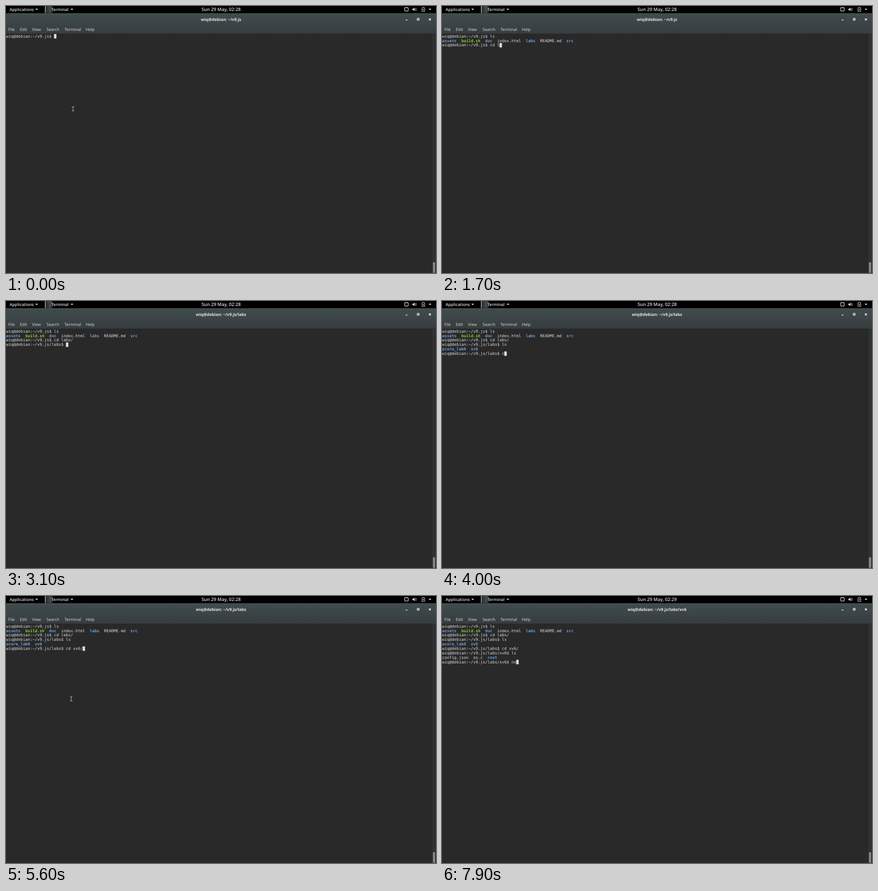
Write an HTML page that moves like this. It is 949 px wide and 590 px high and loops after 8 s.

```html
<!DOCTYPE html>
<html lang="en">
<head>
<meta charset="utf-8">
<title>Terminal session</title>
<style>
  html, body { margin: 0; width: 100%; height: 100%; overflow: hidden; background: #292929; }
  svg { display: block; width: 949px; height: 590px; }
  text { white-space: pre; text-rendering: geometricPrecision; }
  .ui { font-family: "Open Sans", "Noto Sans", sans-serif; font-size: 9px; fill: #dedede; }
  .panel { font-weight: 600; }
  .clock { font-size: 10.1px; text-anchor: middle; }
  .title { font-weight: 700; text-anchor: middle; fill: #e4e6e6; }
  .term { font-family: "DejaVu Sans Mono", monospace; font-size: 8.75px; fill: #dcdcdc; }
  .dir { font-weight: 700; fill: #68a0d8; }
  .exe { font-weight: 700; fill: #86cc2c; }
</style>
</head>
<body>
<svg viewBox="0 0 949 590" xmlns="http://www.w3.org/2000/svg">
  <defs>
    <linearGradient id="bar" x1="0" y1="0" x2="0" y2="1">
      <stop offset="0" stop-color="#414c4e"/>
      <stop offset=".45" stop-color="#3c4547"/>
      <stop offset="1" stop-color="#383d3f"/>
    </linearGradient>
    <linearGradient id="tab">
      <stop offset="0" stop-color="#242a2a"/>
      <stop offset=".6" stop-color="#485150"/>
      <stop offset="1" stop-color="#000"/>
    </linearGradient>
    <path id="arrow" d="M-3-1.6h6L0 1.7z" fill="#dedede"/>
  </defs>

  <rect width="949" height="590" fill="#292929"/>
  <rect width="949" height="17" fill="#000"/>
  <rect y="16" width="949" height="45" fill="url(#bar)"/>
  <rect y="16" width="949" height="1" fill="#4a5557"/>

  <rect x="88" width="17" height="15.5" fill="url(#tab)"/>
  <rect x="86" width="1.5" height="15.5" fill="#c8cccc"/>
  <g class="ui panel">
    <text x="8" y="11">Applications</text>
    <text x="100" y="11">Terminal</text>
    <text id="clock" class="clock" x="474.7" y="11.3"></text>
  </g>
  <use href="#arrow" x="67.7" y="7.6"/>
  <use href="#arrow" x="145.5" y="7.6"/>
  <use href="#arrow" x="935.7" y="7.6"/>

  <g fill="none" stroke="#dedede">
    <rect x="880" y="3.5" width="7.6" height="7.6" rx="1.2" stroke-width="1.3"/>
    <path d="M897 6h2l2.6-2.5v8L899 9h-2z" fill="#dedede" stroke="none"/>
    <path d="M902.8 5.5q1.5 2 0 4M904.3 4q2.7 3.5 0 7" stroke-width=".9"/>
    <path d="M918 4.2h1.5V3h3v1.2H924v8h-6z" stroke-width="1"/>
    <path d="M921.6 5l-2 3.6h1.6l-.6 2.8 2.3-3.8h-1.6z" fill="#dedede" stroke="none"/>
  </g>

  <g fill="none" stroke="#eceeee" stroke-width="1.5">
    <path d="M882 31h4"/>
    <rect x="907.8" y="27.5" width="3.8" height="3.8"/>
    <path d="M933.5 27.6l4 4m0-4l-4 4"/>
  </g>

  <text id="title" class="ui title" x="474.5" y="33"></text>
  <g class="ui">
    <text x="5" y="55">File</text>
    <text x="30.5" y="55">Edit</text>
    <text x="57.5" y="55">View</text>
    <text x="89.5" y="55">Search</text>
    <text x="129" y="55">Terminal</text>
    <text x="176" y="55">Help</text>
  </g>

  <rect x="941" y="61" width="8" height="529" fill="#303132"/>
  <rect x="942.2" y="566" width="4.8" height="23.5" rx="1.5" fill="#858888"/>

  <g id="screen" class="term"></g>
  <rect id="cursor" width="5.4" height="9.8" fill="#dcdcdc"/>
  <g id="pointer" fill="none">
    <path d="M-2.8-4.5H2.8M-2.8 4.5H2.8M0-4.5v9" stroke="#111" stroke-width="2.4"/>
    <path d="M-2.8-4.5H2.8M-2.8 4.5H2.8M0-4.5v9" stroke="#d8d8d8" stroke-width="1.1"/>
  </g>
</svg>
<script>
const LOOP = 8000;
const HOST = "wiq@debian:";
const LEFT = 0.5, TOP = 62, CHAR = 5.268, LINE = 9.88;
const $ = id => document.getElementById(id);

// Directory listings; a leading "/" marks a folder and "*" an executable.
const listings = {
  "~/v9.js": "/assets  *build.sh  /doc  index.html  /labs  README.md  /src",
  "~/v9.js/labs": "/ucore_lab8  /xv6",
  "~/v9.js/labs/xv6": "config.json  os.c  /root"
};

// Time and keys entered; "\n" runs the command.
const keys = [
  [400, "l"], [600, "s"], [800, "\n"],
  [1200, "c"], [1400, "d"], [1500, " "], [1700, "l"], [1900, "a"], [2100, "bs/"], [2500, "\n"],
  [3200, "l"], [3400, "s"], [3600, "\n"],
  [3900, "c"], [4200, "d"], [4400, " "], [4800, "x"], [5100, "v6/"], [5800, "\n"],
  [6800, "l"], [6900, "s"], [7100, "\n"],
  [7500, "n"], [7800, "v"]
];

function sessionAt(time) {
  const lines = [];
  let dir = "~/v9.js", input = "";
  const prompt = () => `${HOST}${dir}$ ${input}`;
  for (const [start, text] of keys) {
    if (start > time) break;
    if (text !== "\n") { input += text; continue; }
    lines.push(prompt());
    if (input === "ls") lines.push({ list: listings[dir] });
    else dir += "/" + input.slice(3, -1);
    input = "";
  }
  lines.push(prompt());
  return { lines, dir };
}

function listMarkup(list) {
  return list.split("  ").map(name => {
    const kind = { "/": "dir", "*": "exe" }[name[0]];
    return kind ? `<tspan class="${kind}">${name.slice(1)}</tspan>` : name;
  }).join("  ");
}

function drawPointer(time) {
  const early = time < 400;
  const visible = early || (time >= 4600 && time < 5800);
  $("pointer").setAttribute("visibility", visible ? "visible" : "hidden");
  $("pointer").setAttribute("transform", `translate(${early ? 148 : 144} 227.3)`);
}

let shown = "";
function draw(time) {
  const { lines, dir } = sessionAt(time);
  const markup = lines.map((line, row) =>
    `<text x="${LEFT}" y="${(TOP + 7.7 + row * LINE).toFixed(2)}">${line.list ? listMarkup(line.list) : line}</text>`
  ).join("");
  if (markup !== shown) $("screen").innerHTML = shown = markup;

  const last = lines.length - 1;
  $("cursor").setAttribute("x", LEFT + lines[last].length * CHAR);
  $("cursor").setAttribute("y", TOP + last * LINE);
  $("title").textContent = `${HOST} ${dir}`;
  $("clock").textContent = time < 6100 ? "Sun 29 May, 02:28" : "Sun 29 May, 02:29";
  drawPointer(time);
}

const begin = performance.now();
function tick() {
  draw((performance.now() - begin) % LOOP);
  requestAnimationFrame(tick);
}
tick();
</script>
</body>
</html>
```
